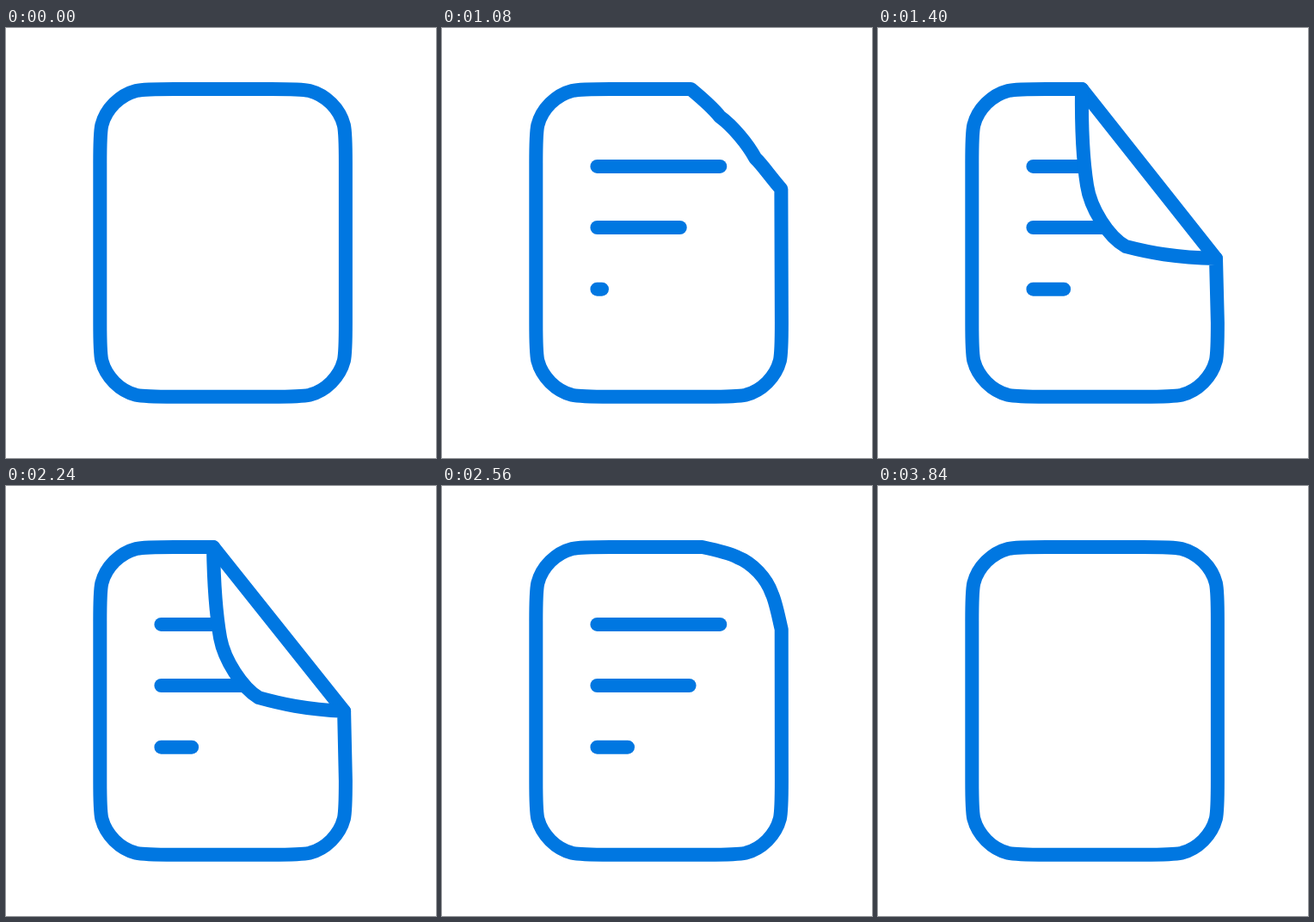
Animation, 500 px wide and 500 px high, one loop 4 s. Source, as an HTML page:

```html
<!DOCTYPE html>
<html lang="en">
<head>
<meta charset="utf-8">
<title>Page curl</title>
<style>
  html, body { margin: 0; width: 100%; height: 100%; overflow: hidden; background: #fff; }
  svg { display: block; width: 100vw; height: 100vh; }
  .ink { fill: none; stroke: #0077e1; stroke-width: 16; stroke-linecap: round; stroke-linejoin: round; }
</style>
</head>
<body>
<svg viewBox="0 0 500 500">
  <clipPath id="page"><path id="pageShape"/></clipPath>
  <g id="lines" class="ink" clip-path="url(#page)"><path/><path/><path/></g>
  <path id="crease" class="ink"/>
  <path id="outline" class="ink"/>
</svg>
<script>
const LOOP = 4000, STEP = 40;
const LEFT = 109.3, RIGHT = 394.9, TOP = 71, BOTTOM = 428.8;

// One smoothed corner, as distances from the corner along both edges.
const half = [[86, 0], [66, 0], [51, 0], [42, 2], [23, 6.9]];
const corner = [...half, ...half.map(([a, b]) => [b, a]).reverse()];

const topRight = corner.map(([a, b]) => [RIGHT - a, TOP + b]);
const bottomRight = corner.map(([a, b]) => [RIGHT - b, BOTTOM - a]);
const bottomLeft = corner.map(([a, b]) => [LEFT + a, BOTTOM - b]);
const topLeft = corner.map(([a, b]) => [LEFT + b, TOP + a]);

// The top right corner when fully curled.
const curled = [
  [237, 71], [236.5, 115], [238, 152], [243, 183], [247, 210],
  [268, 243], [288, 254], [315, 261], [345, 267], [393, 268]
];

// Time windows of each line: drawing, then erasing.
const lines = [
  { y: 160.9, length: 142.9, draw: [0, 800], erase: [3005, 3810] },
  { y: 232, length: 107.2, draw: [556, 1400], erase: [2782, 3582] },
  { y: 303.7, length: 35.7, draw: [1030, 1400], erase: [2532, 2932] }
];
const LINE_X = 180.4;

const $ = id => document.getElementById(id);
const linePaths = $('lines').children;
const progress = (t, [from, to]) => Math.min(1, Math.max(0, (t - from) / (to - from)));
const bezier = (t, a, b) => 3 * a * t * (1 - t) ** 2 + 3 * b * t * t * (1 - t) + t ** 3;

// cubic-bezier(.25, .1, .25, 1)
function ease(p) {
  if (p <= 0 || p >= 1) return p;
  let lo = 0, hi = 1;
  for (let i = 0; i < 24; i++) {
    const mid = (lo + hi) / 2;
    if (bezier(mid, .25, .25) < p) lo = mid; else hi = mid;
  }
  return bezier(lo, .1, 1);
}

const point = ([x, y]) => x.toFixed(2) + ' ' + y.toFixed(2);
const cubics = pts => point(pts[0]) + 'C' + pts.slice(1).map(point).join(' ');

function draw(t) {
  const fold = t < 2000 ? ease(progress(t, [1005, 1400])) : 1 - ease(progress(t, [2200, 2760]));
  const flap = topRight.map((p, i) => p.map((v, k) => v + (curled[i][k] - v) * fold));
  const shape = 'M' + [flap, bottomRight, bottomLeft, topLeft].map(cubics).join('L') + 'Z';
  $('outline').setAttribute('d', shape);
  $('pageShape').setAttribute('d', shape);
  // The crease shows once the flap has passed over it.
  $('crease').setAttribute('d', fold > .34 ? `M${point(flap[0])}L${point(flap[9])}` : '');

  lines.forEach(({ y, length, draw, erase }, i) => {
    const shown = t > draw[0] && t < erase[1];
    const part = t < 2000 ? progress(t, draw) : 1 - progress(t, erase);
    linePaths[i].setAttribute('d', shown ? `M${LINE_X} ${y}h${Math.max(.01, length * ease(part))}` : '');
  });
}

const start = performance.now();
function tick() {
  const t = (performance.now() - start) % LOOP;
  draw(Math.floor(t / STEP) * STEP);
  requestAnimationFrame(tick);
}
tick();
</script>
</body>
</html>
```
